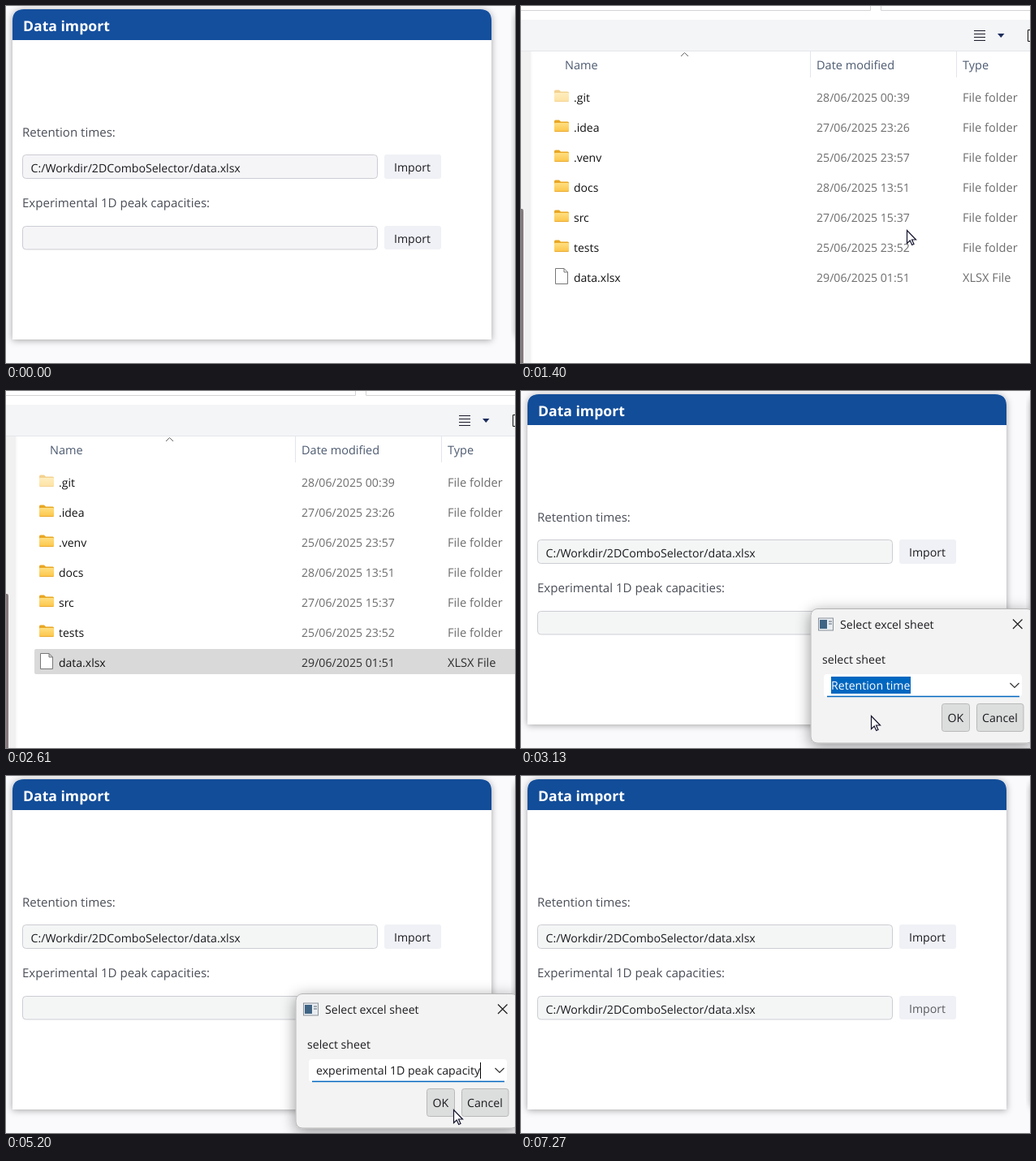
Animation, 627 px wide and 440 px high, one loop 8.13 s. Source, as an HTML page:

```html
<!DOCTYPE html>
<html lang="en">
<head>
<meta charset="utf-8">
<title>Data import</title>
<style>
html, body { margin: 0; width: 100%; height: 100%; overflow: hidden; background: #fafafd; }
svg { display: block; font: 14.15px "Open Sans", "Noto Sans", sans-serif; text-rendering: geometricPrecision; fill: #1c1c20; }
.label { font-size: 15.05px; fill: #4a4e57; }
.title { font-size: 17.6px; font-weight: 700; fill: #fff; }
.field { fill: #f5f5f8; stroke: #cccdd3; }
.head { fill: #144f9e; }
.later .field { fill: #f4f6f6; }
.later .head { fill: #124d99; }
.btn { fill: #f0f1f6; }
.line { fill: none; stroke: #333; }
.column { font-size: 14.5px; fill: #4c5a70; }
.name { font-size: 14px; fill: #111; }
.detail { fill: #6d6d6d; }
.picked .detail { fill: #2e2e2e; }
.push { fill: #dcdddd; stroke: #b9b9b9; }
</style>
</head>
<body>
<svg width="627" height="440" viewBox="0 0 627 440">
  <defs>
    <filter id="soft" x="-10%" y="-10%" width="120%" height="120%">
      <feDropShadow dx="0" dy="1" stdDeviation="4" flood-color="#000" flood-opacity=".36"/>
    </filter>
    <filter id="deep" x="-20%" y="-20%" width="140%" height="140%">
      <feDropShadow dx="0" dy="4" stdDeviation="9" flood-color="#000" flood-opacity=".42"/>
    </filter>
    <linearGradient id="gold" x2="0" y2="1">
      <stop stop-color="#ffdf82"/><stop offset="1" stop-color="#fcc548"/>
    </linearGradient>
    <g id="folder">
      <path d="M0 12V1.500Q0 0 1.500 0H6L8 2H16.500Q18 2 18 3.500V12Z" fill="#e8a723"/>
      <rect y="3.500" width="18" height="11" rx="1.200" fill="url(#gold)"/>
      <path d="M.5 14.100H17.500" stroke="#e3a32c" stroke-width=".8"/>
    </g>
  </defs>

  <g id="app">
    <rect width="627" height="440" fill="#fafafd"/>
    <path d="M8 411V18Q8 4 22 4H584Q598 4 598 18V411Z" fill="#fff" filter="url(#soft)"/>
    <rect x="628" y="4" width="60" height="407" rx="12" fill="#fff" filter="url(#soft)"/>
    <path class="head" d="M8 42V18Q8 4 22 4H584Q598 4 598 18V42Z"/>
    <text class="title" x="21" y="31">Data import</text>
    <text class="label" x="20" y="161">Retention times:</text>
    <rect class="field" x="20.500" y="183.500" width="437" height="29" rx="4"/>
    <text x="30.500" y="205">C:/Workdir/2DComboSelector/data.xlsx</text>
    <rect class="btn" x="466" y="183" width="70" height="30" rx="3"/>
    <text x="478" y="204">Import</text>
    <text class="label" x="20" y="248">Experimental 1D peak capacities:</text>
    <rect class="field" x="20.500" y="271.500" width="437" height="28.500" rx="4"/>
    <text id="path" x="30.500" y="293">C:/Workdir/2DComboSelector/data.xlsx</text>
    <rect class="btn" x="466" y="271" width="70" height="29" rx="3"/>
    <text id="import" x="478" y="292">Import</text>
  </g>

  <g id="files">
    <rect width="627" height="440" fill="#fff"/>
    <g id="listing">
      <path class="line" d="M0 5.500H430.500V0M627 5.500H443.500V0" style="stroke:#d4d4d6"/>
      <rect y="17" width="627" height="38" fill="#f4f5f7"/>
      <path class="line" d="M0 55.500H627" style="stroke:#e4e6ea"/>
      <path class="line" d="M558 30.500H572M558 34.500H572M558 38.500H572M558 42.500H572" style="stroke:#1b1b2a"/>
      <path d="M587 34H595.500L591.250 39Z" fill="#1c2c5c"/>
      <path class="line" d="M630 29.500H624.500V43.500H630" style="stroke:#111"/>
      <rect y="56" width="12" height="384" fill="#f1f1f1"/>
      <rect x="12" y="56" width="2" height="384" fill="#fafafa"/>
      <path d="M0 250H1Q3 250 3 253V440H0Z" fill="#857a7d"/>
      <path class="line" d="M197 62L201.500 57.500L206 62" style="stroke:#666"/>
      <path class="line" d="M356.500 56V88M536.500 56V88" style="stroke:#e1e5ec"/>
      <g class="column">
        <text x="54" y="78">Name</text>
        <text x="364" y="78">Date modified</text>
        <text x="544" y="78">Type</text>
      </g>
      <rect id="row" x="35" y="318" width="600" height="31" rx="2" fill="#d9d9d9"/>
      <g id="rows"></g>
      <path class="line" d="M42.500 323.500H53L57.500 328V342.500H42.500ZM53 323.500V328H57.500" style="fill:#fff;stroke:#777"/>
    </g>
  </g>

  <g id="dialog">
    <rect x="357" y="268.500" width="274" height="165.500" rx="8" fill="#f3f3f3" stroke="#b5b5b5" filter="url(#deep)"/>
    <rect x="366.500" y="280" width="18" height="15" fill="#e9edf2" stroke="#8b9299"/>
    <rect x="368" y="282" width="9" height="11" fill="#3f6484"/>
    <path class="line" d="M379 284H383M379 287H383" style="stroke:#58636e"/>
    <text x="393" y="293">Select excel sheet</text>
    <path class="line" d="M606 281.500L617.500 293M617.500 281.500L606 293" style="stroke:#222;stroke-width:1.300"/>
    <text x="371" y="336">select sheet</text>
    <rect x="373" y="349" width="244" height="28" rx="4" fill="#fff"/>
    <path d="M377 376.500H614" stroke="#0067c0" stroke-width="1.400"/>
    <rect id="mark" x="382" y="352" width="98" height="21" fill="#0067c0"/>
    <text id="choice" x="382" y="368"></text>
    <path id="caret" class="line" d="M584.500 353V373" style="stroke:#000"/>
    <path class="line" d="M602.500 360L608 365.500L613.500 360" style="stroke-width:1.200"/>
    <rect class="push" x="518.500" y="385.500" width="34" height="34" rx="3"/>
    <text x="525.500" y="408">OK</text>
    <rect class="push" x="561.500" y="385.500" width="57.500" height="34" rx="3"/>
    <text x="568" y="408">Cancel</text>
    <g id="popup">
      <rect x="372.500" y="353.500" width="249" height="69" rx="6" fill="#fbfbfb" stroke="#d2d2d2"/>
      <rect id="hover" x="376" width="242" height="30" rx="4" fill="#ebebeb"/>
      <text x="386" y="376">Retention time</text>
      <text x="386" y="408">experimental 1D peak capacity</text>
    </g>
  </g>

  <circle id="click" r="15" fill="#777"/>
  <path id="cursor" d="M.5.500V16.500L4.200 13L6.700 18.500L9 17.500L6.500 12H11.500Z" fill="#fff" stroke="#14142e" stroke-width="1.200"/>
</svg>
<script>
const LOOP = 8130, STEP = 66.7;
const $ = id => document.getElementById(id);

// Cursor stops: time, x, y (y 460 is off stage)
const stops = [
  [0, 555, 460], [119, 555, 460], [120, 555, 385], [460, 479, 279], [520, 482, 274],
  [1190, 482, 274], [1400, 475, 276], [1460, 475, 276], [1590, 293, 280], [1720, 160, 312],
  [1800, 123, 330], [2000, 123, 330], [2200, 150, 460], [2201, 420, 460], [2950, 420, 460],
  [3130, 431, 400], [3160, 431, 400], [3370, 479, 382], [3640, 615, 352], [3710, 605, 367],
  [4510, 605, 367], [4640, 570, 403], [4870, 570, 403], [5200, 551, 411], [7199, 551, 411],
  [7200, 555, 424], [7269, 555, 424], [7270, 555, 460], [LOOP, 555, 460]
];
const clicks = [[660, 790], [1870, 2000], [3910, 3980], [4660, 4790], [5730, 5800]];

const entries = [
  [".git", "28/06/2025 00:39"], [".idea", "27/06/2025 23:26"], [".venv", "25/06/2025 23:57"],
  ["docs", "28/06/2025 13:51"], ["src", "27/06/2025 15:37"], ["tests", "25/06/2025 23:52"],
  ["data.xlsx", "29/06/2025 01:51"]
];
$("rows").innerHTML = entries.map(([name, date], i) => {
  const y = 118 + 37 * i, isFile = name === "data.xlsx";
  const icon = isFile ? "" : `<use href="#folder" x="41" y="${y - 14.5}" opacity="${i ? 1 : .5}"/>`;
  return `<g ${isFile ? 'id="file"' : ""}>${icon}<text class="name" x="65" y="${y}">${name}</text>
    <text class="detail" x="364" y="${y}">${date}</text>
    <text class="detail" x="544" y="${y}" font-size="14.65">${isFile ? "XLSX File" : "File folder"}</text></g>`;
}).join("");

const ramp = (t, a, b) => Math.min(1, Math.max(0, (t - a) / (b - a)));
const fade = (id, value) => { $(id).style.opacity = value; };

function cursorAt(t) {
  const i = stops.findIndex(s => s[0] > t);
  const [t0, x0, y0] = stops[i - 1], [t1, x1, y1] = stops[i];
  const p = Math.min(1, Math.floor((t - t0 + 3) / STEP) * STEP / (t1 - t0));
  return [x0 + (x1 - x0) * p, y0 + (y1 - y0) * p];
}

function draw(t) {
  const [x, y] = cursorAt(t);
  for (const id of ["cursor", "click"]) $(id).setAttribute("transform", `translate(${x} ${y})`);
  const press = clicks.find(([a, b]) => t >= a && t < b);
  fade("click", press ? .35 * (1 - .8 * ramp(t, ...press)) : 0);

  $("app").setAttribute("class", t >= 2690 ? "later" : "");
  fade("path", t >= 6000 ? 1 : 0);
  fade("import", t >= 5870 ? .7 : 1);

  // The file window opens blank, then its listing appears
  const opening = t < 1120 ? .2 * ramp(t, 990, 1120) : .2 + .8 * ramp(t, 1120, 1270);
  fade("files", opening * (1 - ramp(t, 2690, 2850)));
  fade("listing", ramp(t, 1180, 1390));
  const picked = t >= 1870;
  fade("row", picked ? 1 : 0);
  $("file").setAttribute("class", picked ? "picked" : "");

  const shown = ramp(t, 2900, 3060);
  fade("dialog", shown * (1 - ramp(t, 5800, 5960)));
  $("dialog").setAttribute("transform", `translate(494 351) scale(${.92 + .08 * shown}) translate(-494 -351)`);

  const chosen = t >= 4790;
  fade("mark", chosen ? 0 : 1);
  fade("caret", chosen ? 1 : 0);
  $("choice").textContent = chosen ? "experimental 1D peak capacity" : "Retention time";
  $("choice").style.fill = chosen ? "" : "#fff";
  fade("popup", chosen ? 0 : ramp(t, 4150, 4310));
  $("hover").setAttribute("y", t < 4580 ? 356 : 388);
}

function tick() {
  draw(performance.now() % LOOP);
  requestAnimationFrame(tick);
}
tick();
</script>
</body>
</html>
```
